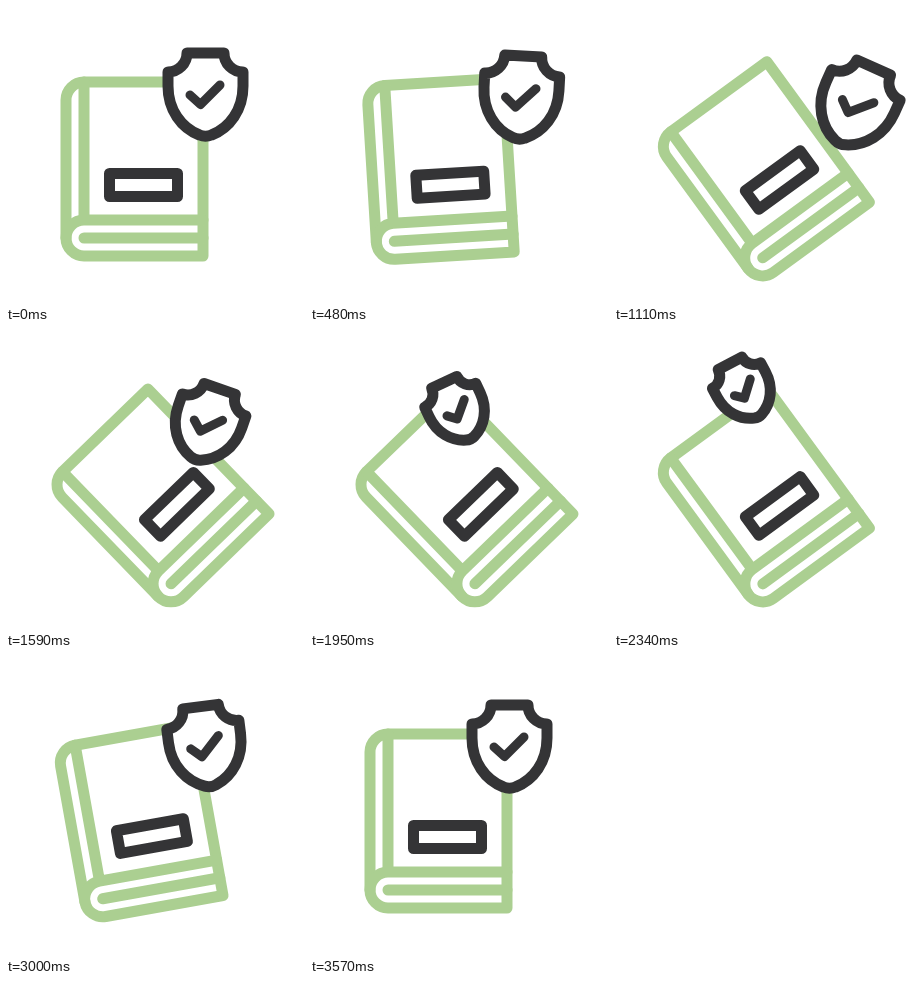
These frames come from a looping animation (298 by 298 pixels, 3.6 s). An HTML page:

```html
<!DOCTYPE html>
<html lang="en">
<head>
<meta charset="utf-8">
<title>Protected book</title>
<style>
  html, body { margin: 0; width: 100%; height: 100%; overflow: hidden; background: #fff; }
  svg { display: block; width: 100vw; height: 100vh; }
  path, rect {
    fill: none; stroke-width: 11; stroke-linecap: round; stroke-linejoin: round;
    vector-effect: non-scaling-stroke;
  }
  .green { stroke: #abcf91; }
  .dark { stroke: #343436; }
  .plate { fill: #fff; }
  .tick { stroke-width: 9; }
</style>
</head>
<body>
<svg viewBox="0 0 298 298">
  <g id="book">
    <path class="green" d="M197 76H78A18 18 0 0 0 60 94V232A18 18 0 0 0 78 250H197Z"/>
    <path class="green" d="M78 76V214M60 232A18 18 0 0 1 78 214H197M78 232H197"/>
    <rect class="dark" x="103.5" y="167.5" width="68" height="23"/>
  </g>
  <g id="shield">
    <path class="dark plate" d="M-18.5 -41H18.5A19 19 0 0 0 37.5 -22V-8C37.5 16 24 34 6 41Q0 43.5 -6 41C-24 34 -37.5 16 -37.5 -8V-22A19 19 0 0 0 -18.5 -41Z"/>
    <path class="dark tick" d="M-15.5 1L-5 10.5L14.5 -9"/>
  </g>
</svg>
<script>
const LOOP = 3600;
const book = document.getElementById('book');
const shield = document.getElementById('shield');

// Eased 0..1 between two times
function ease(t, from, to) {
  const s = Math.min(1, Math.max(0, (t - from) / (to - from)));
  return s * s * (3 - 2 * s);
}

// A value that eases to each target in turn; a move is [target, from, to]
const track = (rest, ...moves) => t => {
  let value = rest;
  for (const [target, from, to] of moves) value += (target - value) * ease(t, from, to);
  return value;
};

const tilt = track(0, [1, 284, 1419], [0, 1915, 3492]);
const x = track(199.5, [243, 150, 1130], [126, 1150, 2250], [199.5, 2250, 2890]);
const y = track(88, [99, 150, 1130], [78, 1320, 2000], [57, 1940, 2300], [88, 2300, 2750]);
const turn = track(0, [24.7, 278, 1194], [-28, 1480, 2030], [0, 2400, 3300]);
const scale = track(1, [0.72, 1200, 2150], [1, 2250, 3200]);

function draw(t) {
  const k = tilt(t);
  book.setAttribute('transform',
    `translate(${24.8 * k} ${4.1 * k}) rotate(${-44.1 * k} 128.5 163)`);
  shield.setAttribute('transform',
    `translate(${x(t)} ${y(t)}) rotate(${turn(t)}) scale(${scale(t)})`);
}

const start = performance.now();
function tick() {
  draw((performance.now() - start) % LOOP);
  requestAnimationFrame(tick);
}
tick();
</script>
</body>
</html>
```
